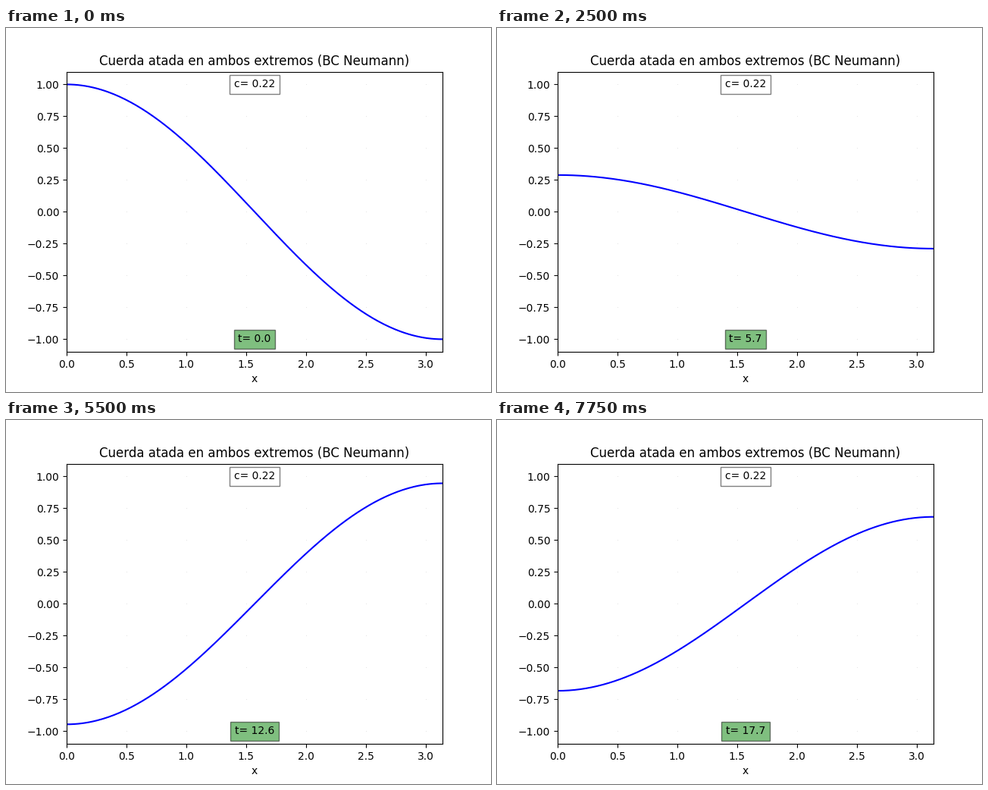
A matplotlib script that plays this animation: 640x480 px, repeating every 8 s.

```python
import numpy as np
import matplotlib.pyplot as plt
from matplotlib.animation import FuncAnimation

FRAMES = 32
INTERVAL = 250            # ms
DT = 20 / 35              # simulated time per frame
C = np.sqrt(0.05)         # wave speed

plt.rcParams["font.family"] = "DejaVu Sans"

fig, ax = plt.subplots(figsize=(6.4, 4.8), dpi=100)
ax.set(xlim=(0, np.pi), ylim=(-1.1, 1.1), xlabel="x",
       title="Cuerda atada en ambos extremos (BC Neumann)")

# Faint dots where the grid lines cross
gx, gy = np.meshgrid(np.arange(0.5, 3.1, 0.5), np.arange(-1, 1.01, 0.25))
ax.plot(gx.ravel(), gy.ravel(), "s", color="#e4e4e4", ms=0.72, mew=0, zorder=1)

x = np.linspace(0, np.pi, 200)
line, = ax.plot(x, np.cos(x), color="b", lw=1.5)


def label(y, text, face):
    return ax.text(np.pi / 2, y, text, ha="center", va="center",
                   bbox=dict(facecolor=face, alpha=0.5))


label(1, f"c= {C:.2f}", "white")
clock = label(-1, "t= 0.0", "green")


def update(i):
    t = i * DT
    line.set_ydata(np.cos(C * t) * np.cos(x))
    clock.set_text(f"t= {t:.1f}")
    return line, clock


anim = FuncAnimation(fig, update, frames=FRAMES, interval=INTERVAL,
                     repeat=True, repeat_delay=0)
plt.show()
```
